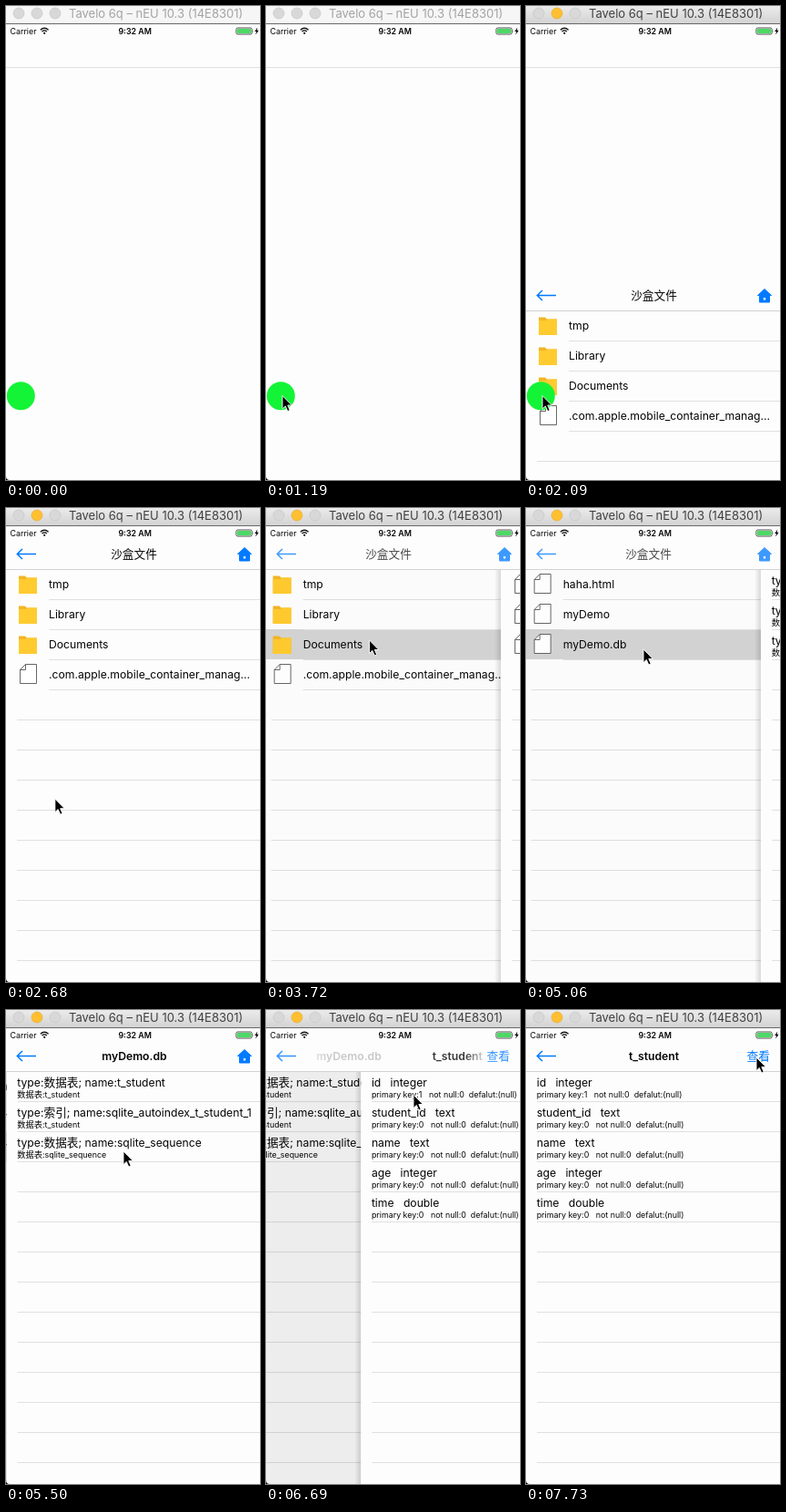
An HTML page for the animation above (8 s loop, 279x520 px).

```html
<!DOCTYPE html>
<html lang="zh">
<head>
<meta charset="utf-8">
<title>Sandbox browser</title>
<style>
  html, body { margin: 0; width: 100%; height: 100%; overflow: hidden; background: #fdfdfd; }
  svg { display: block; width: 279px; height: 520px; }
  text { font-family: Inter, "Noto Sans CJK SC", "Noto Sans CJK", sans-serif; font-size: 12.2px; white-space: pre; fill: #050505; }
  .cjk { font-size: 1.04em; }
  .sub { font-size: 8.9px; }
  .title { font-weight: 600; text-anchor: middle; }
  .title .cjk { font-weight: 500; }
  .line { fill: #e0e0e0; }
  .blue { fill: #007aff; }
</style>
</head>
<body>
<svg viewBox="0 0 279 520">
  <defs>
    <linearGradient id="bar" x2="0" y2="1">
      <stop stop-color="#ebebeb"/><stop offset="1" stop-color="#d3d3d3"/>
    </linearGradient>
    <linearGradient id="shade">
      <stop stop-opacity="0"/><stop offset="1" stop-opacity=".14"/>
    </linearGradient>
    <linearGradient id="edges" gradientUnits="userSpaceOnUse" x1="40" x2="243">
      <stop stop-color="#fff" stop-opacity="0"/>
      <stop offset=".14" stop-color="#fff"/>
      <stop offset=".88" stop-color="#fff"/>
      <stop offset="1" stop-color="#fff" stop-opacity="0"/>
    </linearGradient>
    <mask id="fade" maskUnits="userSpaceOnUse" x="0" y="20" width="279" height="47">
      <rect y="20" width="279" height="47" fill="url(#edges)"/>
    </mask>
    <g id="folder">
      <path d="M14 74.5h7l2 2h11v17H14z" fill="#f3b526"/>
      <path d="M14 78h8l2-1.5h10V94H14z" fill="#ffcb2f"/>
    </g>
    <path id="file" d="M21.5 72.5H33.5V93.5H15.5V78.5L21.5 72.5V78.5H15.5" fill="#fff" stroke="#555" stroke-width=".9"/>
  </defs>

  <rect width="279" height="520" fill="#fdfdfd"/>
  <rect class="line" y="67" width="279" height="1"/>

  <g id="sheet">
    <rect y="20" width="279" height="500" fill="#fdfdfd"/>
    <g id="lists"></g>
    <rect y="20" width="279" height="47" fill="#fdfdfd"/>
    <rect y="67" width="279" height="1" fill="#d2d2d2"/>
    <g id="titles" mask="url(#fade)"></g>
    <path id="back" d="M33 50.5H12.5M18 45L12.3 50.5L18 56" fill="none" stroke="#007aff" stroke-width="1.5"/>
    <path id="home" d="M262 43.5L269.5 50.5H267.5V58H256.5V50.5H254.5ZM260.3 52.5V56H263.7V52.5Z" class="blue" fill-rule="evenodd" stroke="#007aff" stroke-linejoin="round"/>
    <text id="view" class="blue" x="242.5" y="55.3" font-weight="500"><tspan class="cjk">查看</tspan></text>
  </g>

  <circle id="badge" cx="16.3" cy="427.8" r="15.5" fill="#14f436"/>

  <g id="status">
    <text class="sub" x="4.5" y="30.6">Carrier</text>
    <g fill="none" stroke="#111" stroke-width="1.3">
      <path d="M37.8 26.2Q42.2 22.4 46.6 26.2M39.5 28.1Q42.2 25.8 44.9 28.1"/>
    </g>
    <circle cx="42.2" cy="29.8" r="1.1"/>
    <text class="sub title" x="141.7" y="30.6">9:32 AM</text>
    <rect x="252.9" y="24" width="17.2" height="7" rx="1.6" fill="#fff" stroke="#222" stroke-width=".8"/>
    <rect x="253.8" y="24.9" width="15.4" height="5.2" rx=".8" fill="#4cd964"/>
    <path d="M270.8 26.2q1.3 1.3 0 2.6z" fill="#333"/>
    <path d="M276.2 23.5L273.2 28H275L274.2 31.4L277.6 26.7H275.6Z"/>
  </g>

  <g id="window">
    <rect id="barFill" width="279" height="19"/>
    <rect y="19" width="279" height="1" fill="#686868"/>
    <g stroke-width=".7">
      <circle cx="14" cy="8" r="6" fill="#d8d8d8" stroke="#c6c6c6"/>
      <circle id="amber" cx="34" cy="8" r="6"/>
      <circle cx="54" cy="8" r="6" fill="#d8d8d8" stroke="#c6c6c6"/>
    </g>
    <text id="caption" x="69" y="12.9" style="font-size:13px">Tavelo 6q – nEU 10.3 (14E8301)</text>
    <path d="M0 516Q0 520 4 520H0Z"/>
  </g>

  <path id="cursor" d="M0 0V14.6L3.3 11.4L5.8 17L8.2 16L5.8 10.5H10.4Z" fill="#000" stroke="#fff" stroke-width=".9"/>
</svg>

<script>
const LOOP = 8000, WIDTH = 279, ROW = 33, TOP = 67;
const $ = id => document.getElementById(id);

// Runs of picture changes: first time, last time, count.
const runs = [[750, 1190, 4], [2090, 3120, 8], [3270, 3270, 1], [3720, 4760, 8], [5060, 5950, 7], [6690, 7730, 8]];
const steps = [0];
for (const [a, b, n] of runs)
  for (let i = 0; i < n; i++)
    steps.push(Math.floor((a + (n > 1 ? i * (b - a) / (n - 1) : 0)) / 10) * 10);

const sheetStart = 2003;
const pushStarts = [3695, 5035, 6572];
const pointer = [
  [750, 44, 457], [1190, 18, 427.5], [2390, 18, 427.5], [3120, 111.5, 145], [3270, 113.5, 145],
  [3870, 113.5, 145], [4310, 117, 134], [4760, 129, 155], [5500, 129, 155],
  [5950, 162, 93], [6990, 162, 93], [7730, 253, 52]
];

const column = (name, type, key = 0) =>
  [`${name}   ${type}`, `primary key:${key}   not null:0  defalut:(null)`];

const screens = [
  { title: "沙盒文件", picked: 2, icons: ["folder", "folder", "folder", "file"],
    rows: [["tmp"], ["Library"], ["Documents"], [".com.apple.mobile_container_manag…"]] },
  { title: "沙盒文件", picked: 2, icons: ["file", "file", "file"],
    rows: [["haha.html"], ["myDemo"], ["myDemo.db"]] },
  { title: "myDemo.db",
    rows: [["type:数据表; name:t_student", "数据表:t_student"],
           ["type:索引; name:sqlite_autoindex_t_student_1", "数据表:t_student"],
           ["type:数据表; name:sqlite_sequence", "数据表:sqlite_sequence"]] },
  { title: "t_student",
    rows: [column("id", "integer", 1), column("student_id", "text"), column("name", "text"),
           column("age", "integer"), column("time", "double")] }
];

function add(parent, tag, attrs = {}) {
  const el = document.createElementNS("http://www.w3.org/2000/svg", tag);
  for (const key in attrs) el.setAttribute(key, attrs[key]);
  return parent.appendChild(el);
}

function label(parent, string, x, y, cls = "") {
  const el = add(parent, "text", { x, y, class: cls });
  for (const part of string.split(/([\u4e00-\u9fff]+)/).filter(Boolean))
    add(el, "tspan", /[\u4e00-\u9fff]/.test(part) ? { class: "cjk" } : {}).textContent = part;
  return el;
}

for (const s of screens) {
  s.list = add($("lists"), "g");
  add(s.list, "rect", { x: -7, y: TOP, width: 7, height: 453, fill: "url(#shade)" });
  add(s.list, "rect", { y: TOP, width: WIDTH, height: 453, fill: "#fdfdfd" });
  if (s.picked !== undefined)
    s.mark = add(s.list, "rect", { y: TOP + s.picked * ROW, width: WIDTH, height: ROW, fill: "#d4d4d4" });
  for (let i = 0; i < 13; i++) {
    const x = s.icons && i < s.rows.length ? 47 : 12;
    add(s.list, "rect", { class: "line", x, y: TOP + (i + 1) * ROW, width: WIDTH - x, height: 1 });
  }
  s.rows.forEach(([name, detail], i) => {
    const y = TOP + i * ROW;
    if (s.icons) add(s.list, "use", { href: "#" + s.icons[i], y: i * ROW });
    label(s.list, name, s.icons ? 47 : 11.7, y + (detail ? 16.5 : 21.4));
    if (detail) label(s.list, detail, 11.7, y + 28.8, "sub");
  });
  s.dim = add(s.list, "rect", { y: TOP, width: WIDTH, height: 453 });
  s.head = label($("titles"), s.title, 140.5, 55.2, "title");
}

// Critically damped spring, 0 to 1.
function spring(ms) {
  if (ms <= 0) return 0;
  const x = ms * 0.018, p = 1 - (1 + x) * Math.exp(-x);
  return p > 0.999 ? 1 : p;
}

function pointAt(t) {
  const i = pointer.findIndex(k => k[0] > t);
  if (i < 0) return pointer[pointer.length - 1].slice(1);
  if (i === 0) return pointer[0].slice(1);
  const [a, x0, y0] = pointer[i - 1], [b, x1, y1] = pointer[i];
  const f = (t - a) / (b - a);
  return [x0 + (x1 - x0) * f, y0 + (y1 - y0) * f];
}

const move = (el, x, y = 0) => el.setAttribute("transform", `translate(${x.toFixed(2)} ${y.toFixed(2)})`);
const show = (el, on) => el.setAttribute("opacity", +on);

function draw(time) {
  const t = steps.filter(s => s <= time).pop();
  const active = t >= 2090;

  $("barFill").setAttribute("fill", active ? "url(#bar)" : "#f6f6f6");
  $("amber").setAttribute("fill", active ? "#ffbf30" : "#d8d8d8");
  $("amber").setAttribute("stroke", active ? "#e5ad36" : "#c6c6c6");
  $("caption").style.fill = active ? "#404040" : "#a3a3a3";

  show($("sheet"), active);
  move($("sheet"), 0, Math.floor(500 * (1 - spring(t - sheetStart))));
  show($("badge"), t < 2240);

  const pushes = pushStarts.map(start => spring(t - start));
  screens.forEach((s, i) => {
    const enter = i ? pushes[i - 1] : 1, leave = pushes[i] || 0;
    move(s.list, WIDTH * (1 - enter) - 84 * leave);
    show(s.list, enter > 0);
    show(s.dim, 0.1 * leave);
    if (s.mark) show(s.mark, leave > 0);
    move(s.head, 187 * (1 - enter) - 79 * leave);
    show(s.head, Math.sqrt(enter) * (1 - Math.sqrt(leave)));
  });

  const blend = pushes.reduce((o, p) => o - 1.2 * Math.sqrt(p) * (1 - Math.sqrt(p)), 1);
  show($("back"), blend);
  show($("home"), pushes[2] ? Math.max(0, 1 - 2 * pushes[2]) : blend);
  show($("view"), Math.sqrt(pushes[2]));

  move($("cursor"), ...pointAt(t));
  show($("cursor"), t >= 750);
}

function tick() {
  draw(performance.now() % LOOP);
  requestAnimationFrame(tick);
}
tick();
</script>
</body>
</html>
```
